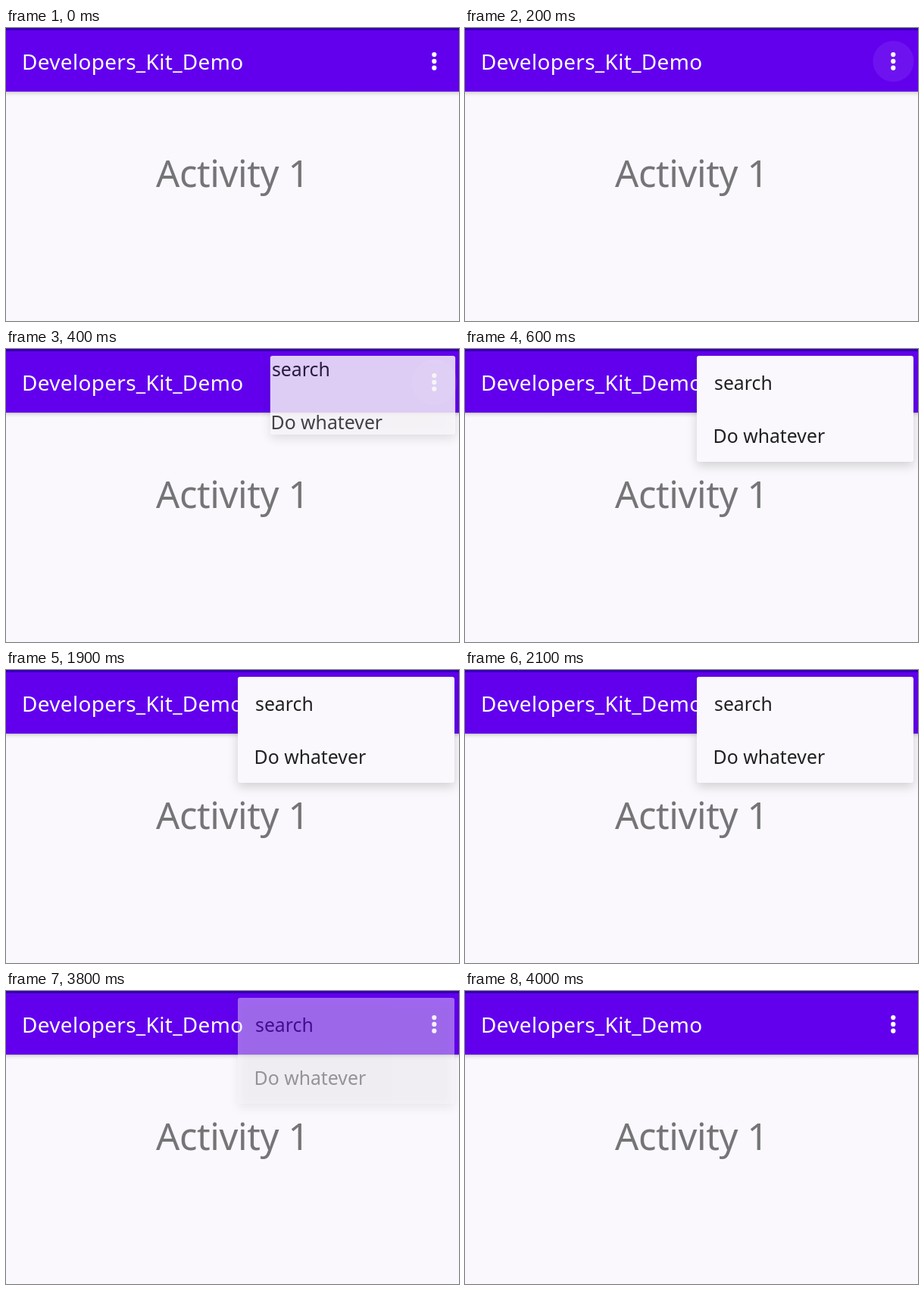
An HTML page for the animation above (6900 ms loop, 598 px wide and 387 px high).

```html
<!DOCTYPE html>
<html lang="en">
<head>
<meta charset="utf-8">
<title>Overflow menu</title>
<style>
  html, body { margin: 0; width: 100%; height: 100%; overflow: hidden; background: #faf8fc; }
  svg { display: block; width: 598px; height: 387px; }
  text { font-family: "Noto Sans", "Open Sans", sans-serif; }
  .title { font-size: 28px; letter-spacing: .3px; fill: #fff; }
  .label { font-size: 49px; letter-spacing: -.4px; fill: #757477; }
  .item { font-size: 24.8px; fill: #212023; }
</style>
</head>
<body>
<svg viewBox="0 0 598 387">
  <defs>
    <linearGradient id="edge" x1="0" y1="0" x2="0" y2="1">
      <stop offset="0" stop-opacity=".2"/>
      <stop offset=".4" stop-opacity=".06"/>
      <stop offset="1" stop-opacity="0"/>
    </linearGradient>
    <filter id="blur" filterUnits="userSpaceOnUse" x="250" y="-30" width="390" height="240">
      <feGaussianBlur stdDeviation="7"/>
    </filter>
    <clipPath id="reveal"><rect class="frame" rx="3"/></clipPath>
  </defs>
  <rect width="598" height="387" fill="#faf8fc"/>
  <rect y="84" width="598" height="7" fill="url(#edge)"/>
  <rect width="598" height="84" fill="#6200ee"/>
  <rect width="598" height="3" fill="#3700b3"/>
  <text class="title" x="21" y="54.5">Developers_Kit_Demo</text>
  <text class="label" x="198" y="210">Activity 1</text>
  <circle id="ripple" cx="565.5" cy="44" fill="#fff"/>
  <g fill="#fff">
    <circle cx="565.3" cy="35.1" r="3.1"/>
    <circle cx="565.3" cy="43.9" r="3.1"/>
    <circle cx="565.3" cy="52.7" r="3.1"/>
  </g>
  <g id="shadow">
    <rect class="frame" rx="3" transform="translate(0 5)" fill-opacity=".17" filter="url(#blur)"/>
  </g>
  <g id="menu">
    <rect class="frame" rx="3" fill="#faf8fc"/>
    <g clip-path="url(#reveal)">
      <g id="items">
        <text class="item" x="329" y="53.5">search</text>
        <text class="item" x="327.6" y="124">Do whatever</text>
      </g>
    </g>
  </g>
</svg>
<script>
const LOOP = 6900, STEP = 100;
const byId = id => document.getElementById(id);
const [ripple, shadow, menu, items] = ["ripple", "shadow", "menu", "items"].map(byId);
const frames = document.querySelectorAll(".frame");
const clamp = v => Math.min(1, Math.max(0, v));
const set = (el, attrs) => {
  for (const key in attrs) el.setAttribute(key, attrs[key]);
};

function draw(t) {
  // The menu grows and slides out of the button, then fades away in place.
  const open = clamp((t - 250) / 300);
  const px = 1 - (1 - open) ** 2.4;
  const py = open * open * (3 - 2 * open);
  const fade = (1 + Math.cos(Math.PI * clamp((t - 3628) / 310))) / 2;
  const alpha = clamp(open * 1.65) * fade;

  const dx = 116 * (1 - px), dy = -36 * (1 - py);
  const halfW = 33 + 110 * px, halfH = 34 + 36 * py;
  const box = {
    x: 449 + dx - halfW, y: 79 + dy - halfH,
    width: 2 * halfW, height: 2 * halfH
  };
  frames.forEach(el => set(el, box));
  set(items, { transform: `translate(${dx} ${dy})` });
  set(menu, { opacity: alpha });
  set(shadow, { opacity: alpha * px });

  const press = clamp((t - 50) / 200);
  const release = 1 - clamp((t - 350) / 250);
  set(ripple, { r: 18 + 12 * press, opacity: t < STEP ? 0 : 0.1 * press * release });
}

function tick(now) {
  draw(Math.floor((now % LOOP) / STEP) * STEP);
  requestAnimationFrame(tick);
}
draw(0);
requestAnimationFrame(tick);
</script>
</body>
</html>
```
